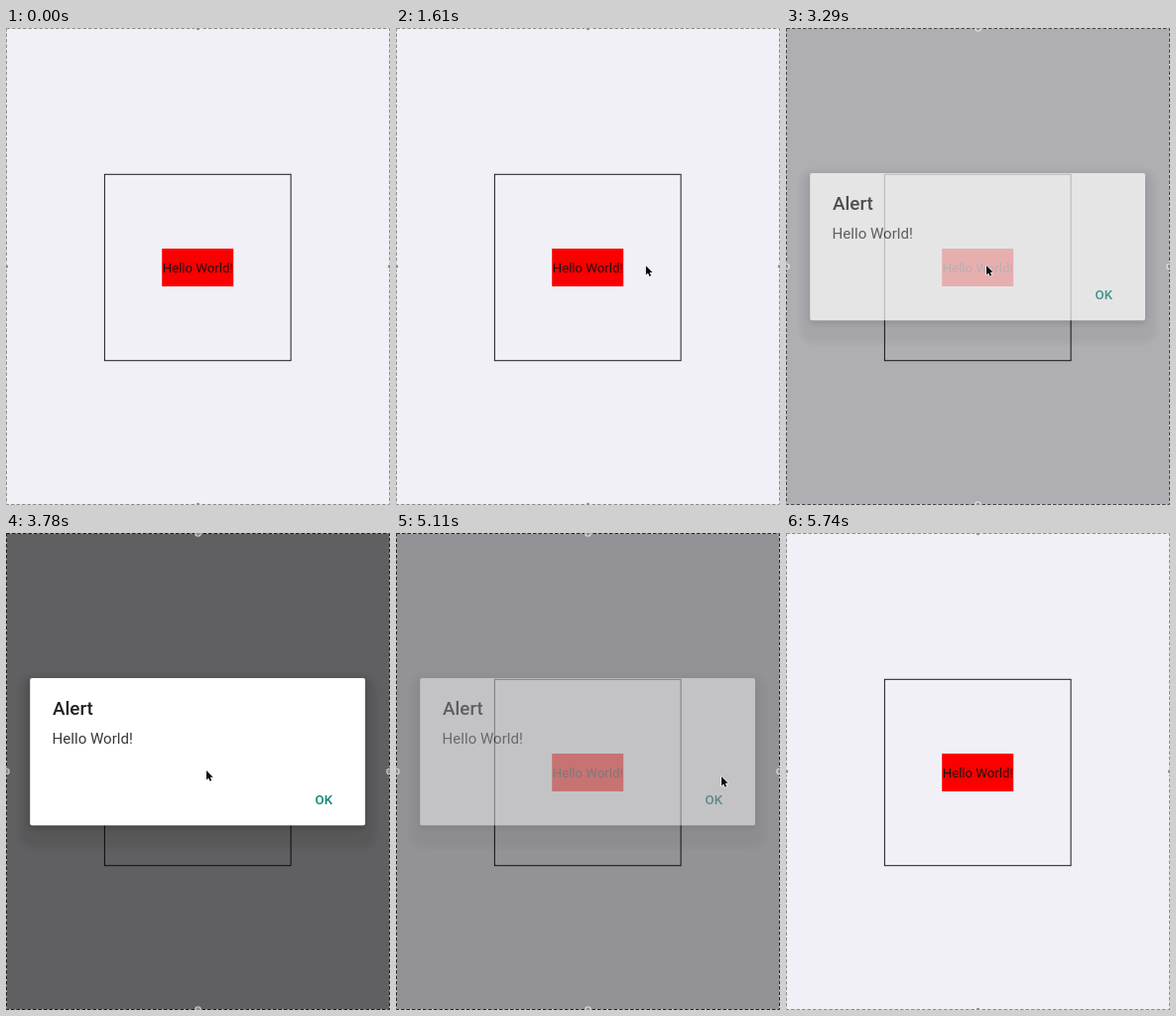
Recreate the animation shown at these times as an HTML page. Size 387 px wide and 480 px high, loop 6020 ms.

```html
<!DOCTYPE html>
<html lang="en">
<head>
<meta charset="utf-8">
<title>Alert demo</title>
<style>
  html, body { margin: 0; width: 100%; height: 100%; overflow: hidden; background: #f1f0f6; }
  svg { display: block; width: 100vw; height: 100vh; }
  text { font-family: Roboto, sans-serif; }
  #halo { filter: blur(3px); }
  #panel { filter: drop-shadow(0 3px 3px rgba(0, 0, 0, .2)); }
</style>
</head>
<body>
<svg viewBox="0 0 387 480">
  <rect width="387" height="480" fill="#f1f0f6"/>
  <rect x="99.4" y="147.3" width="187.7" height="187.4" fill="none" stroke="#1c1c1e"/>
  <rect x="157.2" y="222" width="72" height="38" fill="#fb0000"/>
  <text x="193.3" y="245.6" font-size="13.18" text-anchor="middle" fill="#1d1012">Hello World!</text>

  <rect id="dim" width="387" height="480"/>

  <g id="dialog">
    <rect id="halo" x="14" y="143" width="359" height="174" rx="14" opacity=".08"/>
    <rect id="panel" x="24.2" y="145.9" width="337.8" height="148.4" rx="2" fill="#fff"/>
    <text x="47" y="183" font-size="18.83" font-weight="500" fill="#212124">Alert</text>
    <text x="46.6" y="212.3" font-size="15.07" fill="#38383a">Hello World!</text>
    <text x="320.3" y="273" font-size="13.18" font-weight="500" text-anchor="middle" fill="#108577">OK</text>
  </g>

  <g id="outline" fill="none">
    <rect id="gaps" x=".5" y=".5" width="386" height="479"/>
    <rect id="dashes" x=".5" y=".5" width="386" height="479" stroke-dasharray="3.5 2"/>
    <g id="handles"></g>
  </g>

  <path id="cursor" d="M0 0V9.4L2.1 7.4L3.6 10.8L5.2 10.1L3.8 6.8H6.7Z"
        fill="#0a0a0a" stroke="#fff" stroke-width="1.2" paint-order="stroke" stroke-linejoin="round"/>
</svg>
<script>
  const LOOP = 6020, STEP = 70;
  const get = id => document.getElementById(id);
  const clamp = v => Math.min(1, Math.max(0, v));
  const progress = (t, from, to) => clamp((t - from) / (to - from));
  const mix = (a, b, k) => a + (b - a) * k;
  const smooth = p => p * p * (3 - 2 * p);
  const gray = (a, b, k) => {
    const v = Math.round(mix(a, b, k));
    return `rgb(${v},${v},${v})`;
  };

  // The pointer enters, waits, taps the label, wanders, taps OK and leaves.
  const stops = [
    { t: 350, x: 353, y: 297 },
    { t: 910, x: 253, y: 238 },
    { t: 2590, x: 250, y: 241 },
    { t: 2870, x: 202, y: 239 },
    { t: 3780, x: 202, y: 239 },
    { t: 4200, x: 317, y: 259 },
    { t: 4620, x: 250, y: 251 },
    { t: 4900, x: 321, y: 266 },
    { t: 5110, x: 328, y: 245 },
    { t: 5320, x: 390, y: 215 }
  ];

  function pointerAt(t) {
    const i = stops.findIndex(s => s.t > t);
    if (i < 1) return null;
    const a = stops[i - 1], b = stops[i];
    const k = smooth(progress(t, a.t, b.t));
    return { x: mix(a.x, b.x, k), y: mix(a.y, b.y, k) };
  }

  // One handle in the middle of each side.
  for (let i = 0; i < 4; i++) {
    const angle = i * Math.PI / 2;
    const at = `cx="${193.5 + 193 * Math.cos(angle)}" cy="${240 + 239.5 * Math.sin(angle)}"`;
    get('handles').innerHTML +=
      `<circle class="ring" ${at} r="2.6" stroke-width="1.4"/><circle ${at} r="1.7" fill="#8d8d90"/>`;
  }
  const rings = document.querySelectorAll('.ring');

  function draw(t) {
    const opening = progress(t, 3115, 3500), closing = progress(t, 5000, 5320);
    const dim = opening - closing;
    const alpha = closing ? (1 - closing) ** 1.9 : 1 - (1 - opening) ** 1.9;
    get('dim').setAttribute('opacity', dim * .6);
    get('dialog').setAttribute('opacity', alpha);
    get('gaps').setAttribute('stroke', gray(232, 165, dim));
    get('dashes').setAttribute('stroke', gray(142, 30, Math.min(1, dim * 1.4)));
    rings.forEach(r => r.setAttribute('stroke', gray(241, 200, dim)));

    const tip = pointerAt(t), cursor = get('cursor');
    cursor.setAttribute('visibility', tip ? 'visible' : 'hidden');
    if (tip) cursor.setAttribute('transform', `translate(${tip.x} ${tip.y})`);
  }

  const start = performance.now();
  function tick() {
    const t = (performance.now() - start) % LOOP;
    draw(Math.floor(t / STEP) * STEP);
    requestAnimationFrame(tick);
  }
  tick();
</script>
</body>
</html>
```
